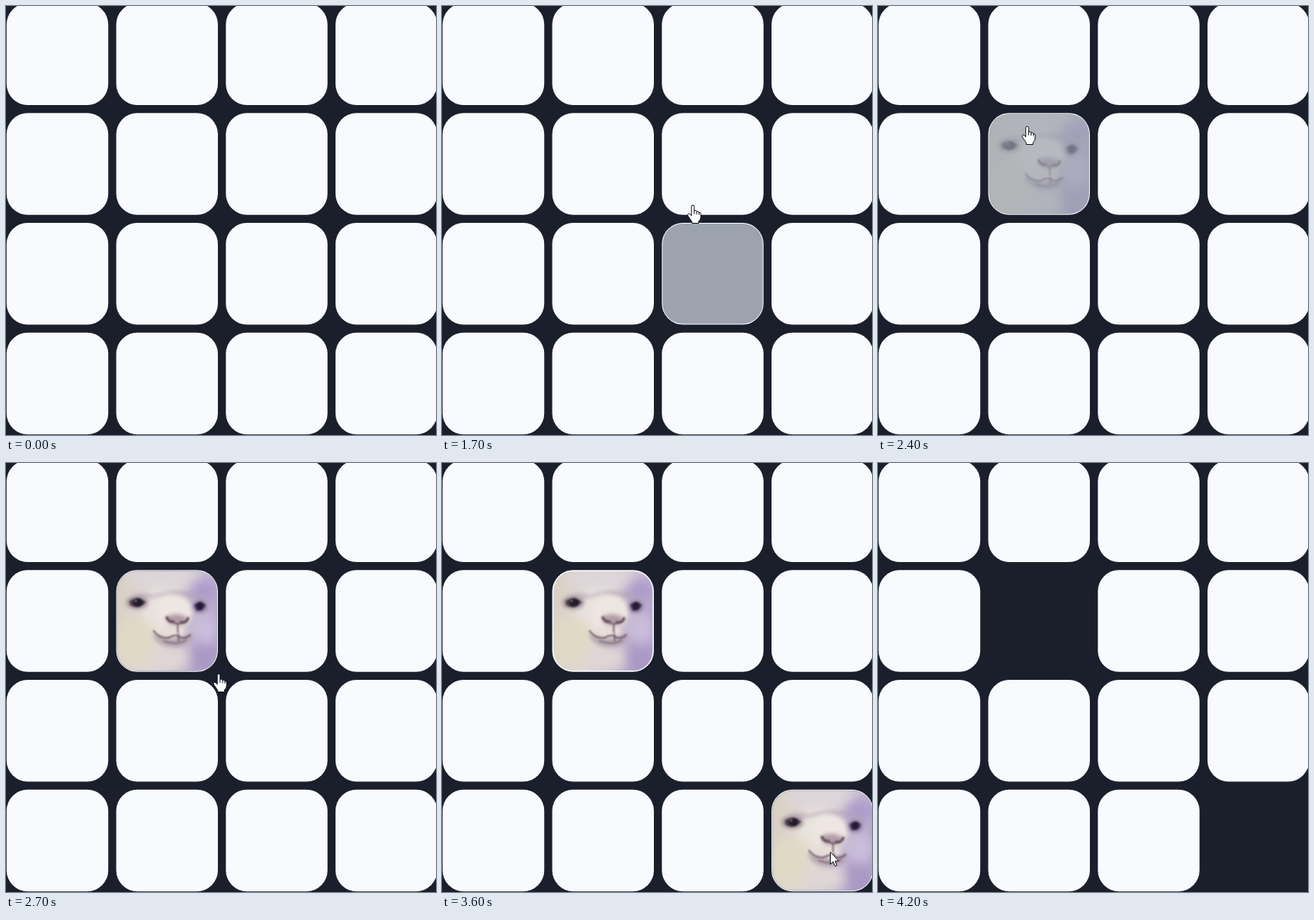
Recreate the animation shown at these times as an HTML page. Size 552 by 550 pixels, loop 6100 ms.

```html
<!DOCTYPE html>
<html lang="en">
<head>
<meta charset="utf-8">
<title>Memory game</title>
<style>
  html, body { margin: 0; width: 100%; height: 100%; overflow: hidden; background: #1b1f2b; }
  svg { display: block; width: 552px; height: 550px; }
</style>
</head>
<body>
<svg id="stage" viewBox="0 0 552 550">
  <defs>
    <linearGradient id="wool" x1="0" y1="0.2" x2="1" y2="0.5">
      <stop offset="0" stop-color="#d9d0c3"/>
      <stop offset="0.5" stop-color="#dfd8d6"/>
      <stop offset="1" stop-color="#b3a3cb"/>
    </linearGradient>
    <clipPath id="cut"><rect x="1.7" y="1.7" width="127.1" height="127.1" rx="25"/></clipPath>
    <filter id="soft" x="-60%" y="-60%" width="220%" height="220%"><feGaussianBlur stdDeviation="7"/></filter>
    <filter id="mild" x="-60%" y="-60%" width="220%" height="220%"><feGaussianBlur stdDeviation="2.5"/></filter>
    <filter id="fine" x="-60%" y="-60%" width="220%" height="220%"><feGaussianBlur stdDeviation="0.9"/></filter>
    <g id="alpaca" clip-path="url(#cut)">
      <rect width="131" height="131" fill="url(#wool)"/>
      <g filter="url(#soft)">
        <ellipse cx="62" cy="12" rx="46" ry="15" fill="#ddd5d9"/>
        <ellipse cx="112" cy="27" rx="19" ry="16" fill="#ad9bcb"/>
        <ellipse cx="58" cy="56" rx="26" ry="34" fill="#e9e3df"/>
        <ellipse cx="26" cy="92" rx="27" ry="32" fill="#e0d9c5"/>
        <ellipse cx="66" cy="113" rx="28" ry="16" fill="#dfd7d5"/>
        <ellipse cx="113" cy="112" rx="18" ry="27" fill="#aa99c5"/>
        <ellipse cx="115" cy="76" rx="15" ry="20" fill="#c9bedb"/>
      </g>
      <g filter="url(#mild)">
        <path d="M12 39Q28 24 48 32Q70 23 98 28L124 40L110 43Q88 30 65 31Q44 39 12 39Z" fill="#b3a4b4" opacity=".6"/>
        <ellipse cx="27" cy="42" rx="14" ry="8" fill="#8d7b85" opacity=".75"/>
        <ellipse cx="107" cy="47" rx="10" ry="8" fill="#7f6a9a" opacity=".75"/>
        <ellipse cx="75" cy="54" rx="22" ry="21" fill="#eee6e3"/>
        <path d="M46 81Q52 100 77 99Q97 97 98 81Q78 92 46 81Z" fill="#a898a6" opacity=".75"/>
        <ellipse cx="70" cy="79" rx="18" ry="8" fill="#e7ddd9"/>
        <path d="M63 60Q78 52 92 61L88 69Q78 74 66 68Z" fill="#b49ba5"/>
      </g>
      <g filter="url(#fine)">
        <path d="M17 40Q27 32 38 41Q29 52 18 45Z" fill="#4b3f4b"/>
        <ellipse cx="28" cy="41.5" rx="6.5" ry="5.5" fill="#211d2c"/>
        <path d="M100 45Q108 37 115 45Q111 54 103 52Z" fill="#463757"/>
        <ellipse cx="107.5" cy="46" rx="4.5" ry="5" fill="#211b31"/>
        <g fill="none" stroke="#65505c" stroke-linecap="round">
          <path d="M65 61Q68 67 73 66M92 62Q90 68 83 67" stroke-width="3.5"/>
          <path d="M72 66Q79 71 85 67M79 70V80" stroke-width="1.6"/>
          <path d="M48 78Q55 88 67 87Q76 82 80 85Q87 90 95 83" stroke-width="1.8"/>
          <path d="M61 91Q77 97 89 90" stroke-width="2" opacity=".6"/>
          <path d="M80 82V91" stroke-width="1.5"/>
        </g>
        <circle cx="25" cy="39.5" r="1" fill="#a69cad"/>
      </g>
    </g>
  </defs>
  <rect width="552" height="550" fill="#1b1f2b"/>
  <g id="board"></g>
  <g id="hand" stroke="#11131a" stroke-linejoin="round" stroke-linecap="round">
    <path fill="#fff" d="M-1.8 13.5V2Q-1.8 .3 0 .3T1.8 2V7.3Q4.4 6.4 5 8.4Q7.3 7.6 7.9 9.6Q10.2 9.2 10.2 11.6V16Q10.2 18.5 7.5 21V23.5H-1.2V21.5L-6.2 14.2Q-7.4 12 -5.4 11.2Q-4 10.9 -1.8 13.5Z"/>
    <path fill="none" d="M1.8 7.3V11.5M5 8.4V11.8M7.9 9.6V12.2"/>
  </g>
  <path id="arrow" fill="#fff" stroke="#11131a" d="M.5 .8V16.5L4.1 13.1L6.6 18.8L9 17.8L6.6 12.2H11.4Z"/>
</svg>
<script>
const LOOP = 6100, STEP = 100, PITCH = 140.75, SIZE = 130.5;
const PAIR = [5, 15];
const REVEAL = { 5: 2400, 15: 3100 };

// time, x, y of the pointer tip
const PATH = [
  [1600, 403.5, 326], [1700, 322, 255], [1800, 240, 188], [1900, 203, 161],
  [2000, 191.5, 154], [2400, 191.5, 154], [2500, 199, 166], [2600, 228, 208],
  [2700, 273, 270], [2800, 388, 392], [2900, 474, 478], [3000, 490, 491],
  [3200, 498, 498], [3800, 498, 498], [4000, 535, 516], [4100, 560, 525]
];
// start time, hovered tile
const HOVER = [[0, -1], [1600, 11], [1700, 10], [1800, 6], [1900, 5], [2800, 10], [2900, 15], [4200, -1]];

const byId = id => document.getElementById(id);
const clamp = v => Math.max(0, Math.min(1, v));

byId('board').innerHTML = Array.from({ length: 16 }, (_, i) => {
  const x = 0.75 + (i % 4) * PITCH, y = -3.5 + Math.floor(i / 4) * PITCH;
  const face = PAIR.includes(i) ? '<use href="#alpaca" class="face"/>' : '';
  return `<g transform="translate(${x} ${y})">
    <rect width="${SIZE}" height="${SIZE}" rx="27" fill="#f9fafe"/>
    <rect class="shade" x="1" y="1" width="${SIZE - 2}" height="${SIZE - 2}" rx="26" fill="#9ca3af"/>
    ${face}</g>`;
}).join('');

const tiles = [...byId('board').children].map(node => ({
  node, shade: node.querySelector('.shade'), face: node.querySelector('.face')
}));

function pointerAt(t) {
  const next = PATH.findIndex(p => p[0] > t);
  if (next < 1) return null;
  const [t0, x0, y0] = PATH[next - 1], [t1, x1, y1] = PATH[next];
  const k = (t - t0) / (t1 - t0);
  return [x0 + (x1 - x0) * k, y0 + (y1 - y0) * k];
}

function place(node, pos, visible) {
  node.style.display = pos && visible ? '' : 'none';
  if (pos) node.setAttribute('transform', `translate(${pos[0]} ${pos[1]})`);
}

function draw(time) {
  const t = Math.floor(time % LOOP / STEP) * STEP;
  const hovered = HOVER.filter(h => h[0] <= t).pop()[1];
  const gone = clamp((t - 3700) / 500);
  tiles.forEach(({ node, shade, face }, i) => {
    shade.style.display = i === hovered ? '' : 'none';
    if (!face) return;
    face.style.opacity = clamp((t - REVEAL[i] + STEP) / 300);
    node.style.opacity = 1 - gone;
  });
  const pos = pointerAt(t), clicked = t >= 3200;
  place(byId('hand'), pos, !clicked);
  place(byId('arrow'), pos, clicked);
}

const start = performance.now();
function tick() {
  draw(performance.now() - start);
  requestAnimationFrame(tick);
}
tick();
</script>
</body>
</html>
```
